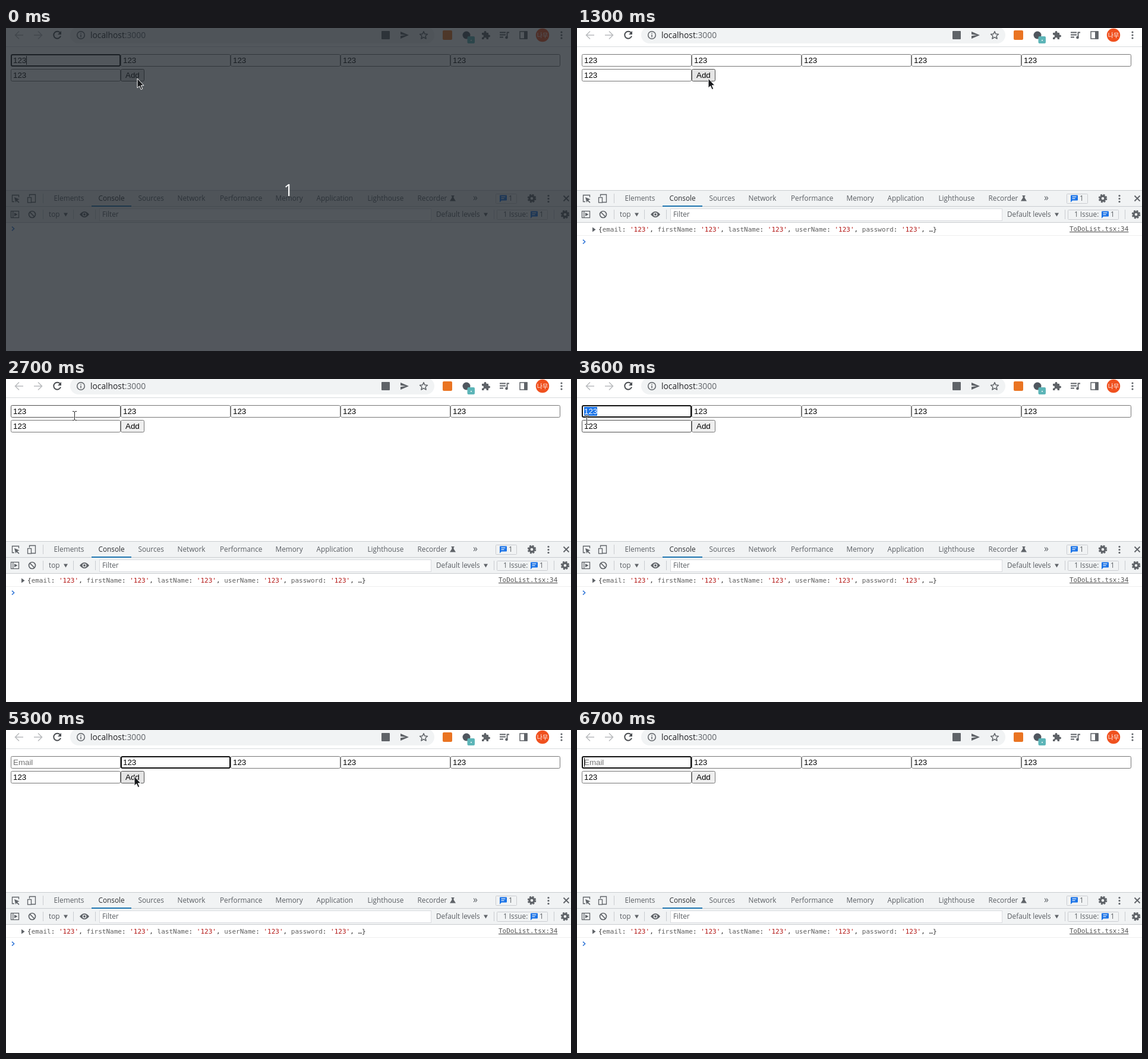
Recreate the animation shown at these times as an HTML page. Size 951 by 544 pixels, loop 7300 ms.

```html
<!DOCTYPE html>
<html lang="en">
<head>
<meta charset="utf-8">
<title>Form focus demo</title>
<style>
html, body { margin: 0; width: 100%; height: 100%; overflow: hidden; background: #fff; }
svg { display: block; }
text { white-space: pre; }
.ui { font: 11.8px "Open Sans", "Noto Sans", sans-serif; fill: #5a5e63; }
.field { font: 13.333px "Liberation Sans", Arial, sans-serif; fill: #000; }
.mono { font: 11px "DejaVu Sans Mono", monospace; fill: #303030; }
.key { fill: #5f5f5f; }
.val { fill: #b31412; }
.line { fill: none; stroke: #5f6368; stroke-width: 1.5; }
.solid { fill: #5f6368; }
</style>
</head>
<body>
<svg id="stage" width="951" height="544" viewBox="0 0 951 544">
  <defs>
    <g id="gear">
      <circle r="4" class="line" stroke-width="3" style="stroke-width:3.4"/>
      <circle r="6.2" class="line" style="stroke-width:2.2" stroke-dasharray="2.9 1.97" />
    </g>
    <g id="dots" class="solid"><circle cy="-5" r="1.6"/><circle r="1.6"/><circle cy="5" r="1.6"/></g>
    <path id="chat" d="M1 0H11Q12 0 12 1V8Q12 9 11 9H3L0 12V1Q0 0 1 0ZM2.5 2.2V3.5H9.5V2.2ZM2.5 5.2V6.5H7.5V5.2Z" fill="#1a73e8" fill-rule="evenodd"/>
    <path id="down" d="M0 0H7L3.5 6Z" class="solid"/>
  </defs>

  <rect width="951" height="544" fill="#fff"/>

  <!-- browser toolbar -->
  <rect y="31" width="951" height="1" fill="#d8dadd"/>
  <rect x="108" y="-2" width="613" height="28" rx="14" fill="#f1f3f4"/>
  <g class="line" stroke-width="1.7">
    <g style="stroke:#b9bbbe"><path d="M29 12H16M22 5.5L15.5 12L22 18.5"/><path d="M47 12H60M54 5.5L60.5 12L54 18.5"/></g>
    <path d="M91.2 8.2A6 6 0 1 0 92 13.5" style="stroke:#4a4d51;stroke-width:2"/>
    <path d="M93 5V11H87Z" style="fill:#4a4d51;stroke:none"/>
    <circle cx="126" cy="12" r="6.3"/>
    <path d="M126 11V15.6M126 8.2V9.8"/>
    <path d="M703 5.8L704.9 10.1L709.5 10.5L706 13.5L707.1 18L703 15.6L698.9 18L700 13.5L696.5 10.5L701.1 10.1Z" stroke-linejoin="round"/>
    <path d="M831 7.5H841M831 11.5H841M831 15.5H837" style="stroke-width:1.8"/>
    <path d="M843.5 16V7.5H847" style="stroke-width:1.8"/>
    <rect x="865" y="6" width="12" height="12"/>
  </g>
  <text x="142" y="17" style="font:13.8px 'Open Sans','Noto Sans',sans-serif" fill="#202124">localhost<tspan fill="#5f6368">:3000</tspan></text>
  <rect x="632" y="5" width="14" height="14" rx="1" class="solid"/>
  <path d="M664 6L678 12L664 18V13.3L673 12L664 10.7Z" class="solid"/>
  <rect x="735" y="4" width="16" height="16" rx="2" fill="#ea7422"/>
  <circle cx="775" cy="12" r="6.5" fill="#50575f"/>
  <rect x="776.5" y="14" width="12.5" height="12" rx="2" fill="#5db5b8"/>
  <rect x="782" y="20" width="2" height="1.5" fill="#fff"/>
  <path d="M801 8H804.5V7A2 2 0 0 1 808.5 7V8H812V11.5H813A2 2 0 0 1 813 15.5H812V19H808.7V18A2.1 2.1 0 0 0 804.5 18V19H801V15.7H802A2.1 2.1 0 0 0 802 11.5H801Z" class="solid"/>
  <circle cx="842.5" cy="16" r="2.3" class="solid"/>
  <rect x="872" y="5.5" width="5.5" height="13" class="solid"/>
  <circle cx="903" cy="12" r="11.2" fill="#f0511f"/>
  <text x="903" y="16" text-anchor="middle" style="font:10px 'Noto Sans CJK KR','Noto Sans CJK',sans-serif" fill="#fff">나무</text>
  <use href="#dots" x="935" y="12"/>

  <!-- page form -->
  <g id="form"></g>
  <rect id="mark" x="12" y="47" width="22" height="15" fill="#1a73e8"/>
  <text id="marked" class="field" x="12" y="59" style="fill:#fff">123</text>
  <rect id="caret" y="47" width="1" height="15" fill="#000"/>

  <!-- developer panel -->
  <rect y="273" width="951" height="55" fill="#f1f3f4"/>
  <g fill="#c9ccd0">
    <rect y="273" width="951" height="1"/><rect y="300" width="951" height="1"/><rect y="327" width="951" height="1"/>
  </g>
  <rect x="144" y="299" width="67" height="2" fill="#1d74b0"/>
  <g id="tabs" class="ui"></g>
  <g id="seps" fill="#c9ccd0"></g>
  <g class="line" style="stroke-width:1.3">
    <path d="M14 292.5H10.5V281.5H21.5V285"/>
    <path d="M39.5 284V280.5H49.5V293.5H43"/>
    <rect x="36.5" y="285.5" width="6" height="8.5"/>
    <path d="M938.5 282.5L947.5 291.5M947.5 282.5L938.5 291.5" style="stroke-width:1.8"/>
    <rect x="8.5" y="308.5" width="13" height="11"/>
    <path d="M11.8 308V320"/>
    <circle cx="44" cy="314" r="5.5" style="stroke-width:1.7"/><path d="M40 310L48 318" style="stroke-width:1.7"/>
  </g>
  <path d="M14 285L22.5 288.5L19 290L22.5 293.5L21.3 294.7L17.8 291.2L16.3 294Z" class="solid"/>
  <path d="M14 311L19.5 314L14 317Z" class="solid"/>
  <path d="M749.5 282H754.5V283.2H753.5V286L757 291.5H747L750.5 286V283.2H749.5Z" class="solid"/>
  <path d="M124 314Q128 309 132 309T140 314Q136 319 132 319T124 314Z" class="solid"/>
  <circle cx="132" cy="314" r="2.6" fill="#5f6368" stroke="#f1f3f4" stroke-width="1.4"/>
  <use href="#gear" x="885" y="287"/><use href="#gear" x="941" y="314"/>
  <use href="#dots" x="913" y="287.5"/>
  <use href="#down" x="97" y="311.5"/><use href="#down" x="804" y="311.5"/>
  <g fill="#f1f3f4" stroke="#caccd0">
    <rect x="157.5" y="304.5" width="558" height="20" fill="#fff" stroke="#d9dbdf"/>
    <rect x="824.5" y="279.5" width="35" height="16" rx="1"/>
    <rect x="826.5" y="306.5" width="85" height="16" rx="1"/>
  </g>
  <use href="#chat" x="831" y="281.5"/><use href="#chat" x="883" y="308.5"/>
  <g id="labels" class="ui"></g>

  <!-- console output -->
  <g id="log">
    <path d="M26 335.5L31.5 339.5L26 343.5Z" class="solid"/>
    <text id="entry" class="mono" x="36" y="343" font-style="italic"></text>
    <text class="mono" x="829" y="342" style="fill:#545454" text-decoration="underline">ToDoList.tsx:34</text>
    <rect y="349" width="951" height="1" fill="#eeeeee"/>
  </g>
  <path id="prompt" d="M10 -3.3L13.6 0L10 3.3" fill="none" stroke="#3579d8" stroke-width="1.6"/>

  <!-- countdown shade -->
  <g id="shade">
    <rect width="951" height="544" fill="#1f252c" fill-opacity=".77"/>
    <text x="475.5" y="283" text-anchor="middle" style="font:28px 'Open Sans','Noto Sans',sans-serif" fill="#fff">1</text>
  </g>

  <path id="arrow" d="M0 0V16L3.6 12.7L6.2 18.6L8.8 17.4L6.2 11.8H11Z" fill="#17191c" stroke="#fff" stroke-width="1"/>
  <g id="beam" fill="none">
    <path d="M-3 -7.5H-1L.5 -6.5L2 -7.5H4M.5 -6.5V6.5M-3 7.5H-1L.5 6.5L2 7.5H4" stroke="#fff" stroke-width="2.6" stroke-opacity=".8"/>
    <path d="M-3 -7.5H-1L.5 -6.5L2 -7.5H4M.5 -6.5V6.5M-3 7.5H-1L.5 6.5L2 7.5H4" stroke="#222" stroke-width="1"/>
  </g>
</svg>
<script>
const LOOP = 7300;
const $ = id => document.getElementById(id);
const show = (el, on) => el.setAttribute("visibility", on ? "visible" : "hidden");

function add(parent, tag, attrs, text) {
  const el = document.createElementNS("http://www.w3.org/2000/svg", tag);
  for (const k in attrs) el.setAttribute(k, attrs[k]);
  if (text) el.textContent = text;
  parent.append(el);
  return el;
}

// Form controls: five inputs, a wrapped sixth, then the button
const controls = Array.from({ length: 7 }, (_, i) => {
  const button = i === 6;
  const x = button ? 193 : 8 + (i % 5) * 185;
  const y = i < 5 ? 44 : 69;
  const w = button ? 40 : 185;
  const box = add($("form"), "rect", {});
  const label = add($("form"), "text", { class: "field", x: x + (button ? 8 : 4), y: y + 15 }, button ? "Add" : "123");
  return { x, y, w, h: 21, button, box, label };
});

const tabs = [["Elements", 80.5], ["Console", 155.5], ["Sources", 222.5], ["Network", 288.5], ["Performance", 360],
  ["Memory", 453.5], ["Application", 522.5], ["Lighthouse", 608.5], ["Recorder", 692.5]];
for (const [name, x] of tabs) {
  add($("tabs"), "text", { x, y: 291, style: name === "Console" ? "fill:#2b2d30" : "" }, name);
}
add($("tabs"), "text", { x: 786, y: 291, style: "font-size:16px" }, "»");

const labels = [["top", 72, 318], ["Filter", 162, 318], ["Default levels", 724, 318], ["1 Issue:", 837, 318], ["1", 898, 318], ["1", 846, 291]];
for (const [s, x, y] of labels) add($("labels"), "text", { x, y }, s);

for (const [x, y] of [[62, 279], [62, 306], [113, 306], [150, 306], [821, 306], [922, 306]]) {
  add($("seps"), "rect", { x, y, width: 1, height: 16 });
}

const entry = $("entry");
add(entry, "tspan", {}, "{");
for (const key of ["email", "firstName", "lastName", "userName", "password"]) {
  add(entry, "tspan", { class: "key" }, key);
  add(entry, "tspan", {}, ": ");
  add(entry, "tspan", { class: "val" }, "'123'");
  add(entry, "tspan", {}, ", ");
}
add(entry, "tspan", {}, "…}");

// Pointer stops: time, x, y
const path = [
  [0, 221, 85], [2100, 218, 84], [2200, 203, 81], [2300, 183, 77], [2400, 158, 71], [2500, 137, 66], [2600, 122, 63], [2700, 115, 62],
  [3000, 108, 62], [3100, 84, 62], [3200, 54, 62], [3300, 31, 62], [3400, 22, 62], [3600, 16, 69],
  [3800, 175, 88], [4000, 281, 67], [4200, 280, 61], [4300, 279, 56], [4400, 278, 53],
  [4900, 252, 62], [5000, 224, 73], [5300, 216, 78],
  [6400, 206, 68], [6500, 186, 56], [6600, 160, 38], [6700, -50, -50]
];
// Index of the focused control, from each time on
const focus = [[0, 0], [1300, -1], [3000, 0], [4800, 1], [6100, 0]];
// Caret position, 0 when hidden
const caret = [[0, 34], [100, 0], [700, 34], [1300, 0], [3000, 34], [3300, 0], [3800, 12], [4300, 0], [6600, 12]];

const at = (list, t) => list.findLast(step => step[0] <= t);

function drawControl(c, focused, hover) {
  const inset = focused ? 1 : 0.5;
  const attrs = {
    x: c.x + inset, y: c.y + inset, width: c.w - 2 * inset, height: c.h - 2 * inset, rx: 2,
    fill: c.button ? (hover ? "#e5e5e5" : "#efefef") : "#fff",
    stroke: focused ? "#101010" : hover ? "#4f4f4f" : "#767676",
    "stroke-width": focused ? 2 : 1
  };
  for (const k in attrs) c.box.setAttribute(k, attrs[k]);
}

function draw(t) {
  const [, px, py] = at(path, t);
  const focused = at(focus, t)[1];
  const over = controls.find(c => px >= c.x && px < c.x + c.w && py >= c.y && py < c.y + c.h);
  controls.forEach((c, i) => drawControl(c, i === focused, c === over));

  const empty = t >= 3800;
  controls[0].label.textContent = empty ? "Email" : "123";
  controls[0].label.style.fill = empty ? "#757575" : "#000";

  const selected = t >= 3300 && t < 3800;
  show($("mark"), selected);
  show($("marked"), selected);
  const cx = at(caret, t)[1];
  show($("caret"), cx > 0);
  $("caret").setAttribute("x", cx);

  const logged = t >= 1300;
  show($("log"), logged);
  $("prompt").setAttribute("transform", `translate(0 ${logged ? 360 : 338})`);
  show($("shade"), t < 100);

  const typing = over && !over.button;
  show($("beam"), typing);
  show($("arrow"), !typing);
  $(typing ? "beam" : "arrow").setAttribute("transform", `translate(${px} ${py})`);
}

const start = performance.now();
function tick() {
  draw((performance.now() - start) % LOOP);
  requestAnimationFrame(tick);
}
tick();
</script>
</body>
</html>
```
